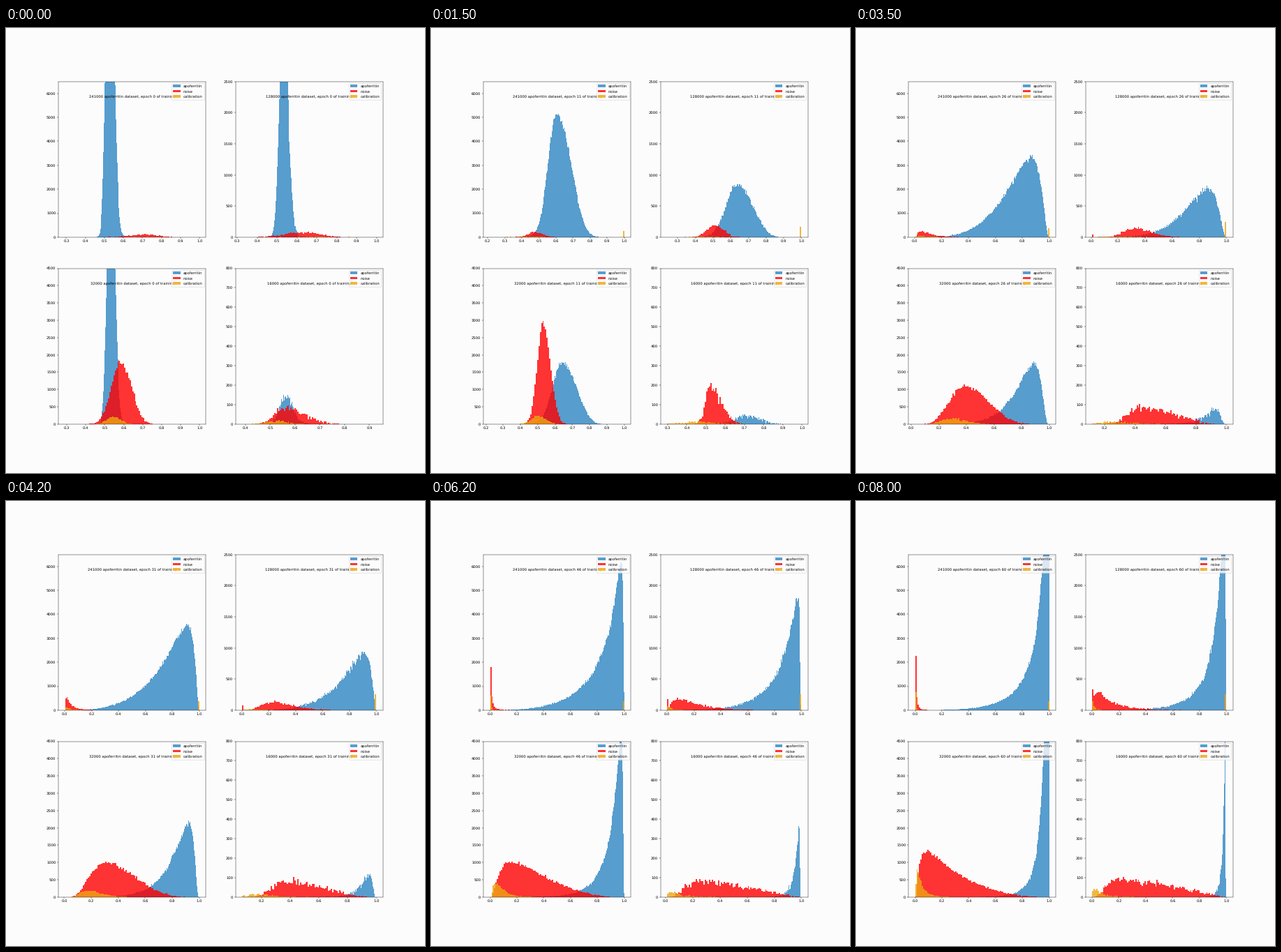
Animation, 600 px wide and 638 px high, one loop 8100 ms. Source, as a matplotlib script:

```python
import numpy as np
import matplotlib.pyplot as plt
from matplotlib.animation import FuncAnimation

plt.rcParams.update({
    "font.family": "DejaVu Sans", "text.hinting": "none",
    "figure.facecolor": "#fdfcfd", "axes.facecolor": "#fdfcfd",
})

FRAMES, INTERVAL, DPI = 81, 100, 37.5
KNOTS = (0, 11, 21, 40, 60)  # epochs at which the training curves bend

SERIES = [("apoferritin", "#2e86c1", 200), ("noise", "red", 100),
          ("calibration", "#eda612", 100)]

# Scores are bell shaped in logit space. "low" and every "mode" are logits that
# follow the knots; pairs run from the first to the last epoch.
PANELS = [
    dict(size=241000, top=6500, low=(-.88, -1.3, -5.1, -6.9, -8), high=6.5,
         signal=dict(mode=(.1, .42, 1.32, 3.3, 5), total=(213e3, 213e3), width=1.65),
         noise=dict(mode=(.93, -.09, -1.42, -7, -7), total=(2900, 3300),
                    spread=(.37, .18, .57, 1.5, 1.3), skew=1, floor=0),
         calibration=dict(mode=(1.3, -.2, -1.7, -7, -7), total=(400, 900),
                          spread=(.9, .6, .8, 1.3, 1), skew=1, ceiling=380)),
    dict(size=128000, top=2500, low=(-.73, -1.15, -3.2, -9, -9), high=6.5,
         signal=dict(mode=(.12, .54, 1.37, 3.2, 4.6),
                     total=(6e4, 41e3, 43e3, 55e3, 68e3), width=1.5),
         noise=dict(mode=(.53, .05, -.21, -2.06, -3.28), total=(2500, 5000),
                    spread=(.38, .19, .28, 1, 1.25), skew=1, floor=6.5),
         calibration=dict(mode=(.8, -.2, -.8, -5, -6), total=(200, 300),
                          spread=(.7, .5, .7, 1.5, 1.3), skew=1, ceiling=260)),
    dict(size=32000, top=4500, low=(-.89, -1.24, -2.15, -7.6, -9), high=6.5,
         signal=dict(mode=(.12, .58, 1.67, 3.3, 4.9),
                     total=(115e3, 77e3, 78e3, 98e3, 105e3), width=1.25),
         noise=dict(mode=(.33, .12, -.1, -1.42, -2.4), total=(33e3, 45e3),
                    spread=(.19, .13, .38, .93, 1.1), skew=1.3, floor=0),
         calibration=dict(mode=(.19, .02, -.26, -2.67, -4.2), total=(2700, 4500),
                          spread=(.14, .16, .32, .65, .9), skew=1.1, ceiling=0)),
    dict(size=16000, top=800, low=(-.46, -.86, -1.37, -3.84, -6.2), high=2.56,
         signal=dict(mode=(.24, .9, 2.13, 3.75, 4.8),
                     total=(3500, 2000, 1900, 3000, 4200), width=.85),
         noise=dict(mode=(.22, .09, .07, -1.05, -1.37), total=(2200, 5000),
                    spread=(.15, .1, .3, .62, .8), skew=2.3, floor=0),
         calibration=dict(mode=(.06, -.2, -.62, -2.9, -4.3), total=(300, 350),
                          spread=(.14, .3, .4, .65, .9), skew=1.4, ceiling=0)),
]


def at_epoch(values, epoch):
    knots = KNOTS if len(values) == len(KNOTS) else (KNOTS[0], KNOTS[-1])
    return np.interp(epoch, knots, values)


def sigmoid(z):
    return 1 / (1 + np.exp(-z))


def bell(x, mode, left, right, total):
    """Counts at scores x from a two-sided Gaussian in logit space."""
    z = np.log(x / (1 - x)) - mode
    shape = np.exp(-.5 * (z / np.where(z < 0, left, right)) ** 2)
    return total * shape / shape.sum()


def signal_spread(mode, width):
    """The signal widens as it moves away from an undecided score."""
    left = .05 + width * (1 - np.exp(-(mode / 2) ** 1.5))
    right = .03 + .62 * width * np.tanh(mode) ** 1.2
    return left, right


def histograms(panel, epoch, rng):
    """Noisy counts and bin edges for the three series."""
    low = sigmoid(at_epoch(panel["low"], epoch))
    high = sigmoid(panel["high"] + .27 * epoch)
    for key, (_, _, bins) in zip(("signal", "noise", "calibration"), SERIES):
        curve = panel[key]
        edges = np.linspace(low, high, bins + 1)
        x = (edges[:-1] + edges[1:]) / 2
        mode = at_epoch(curve["mode"], epoch)
        if key == "signal":
            left, right = signal_spread(mode, curve["width"])
        else:
            left = at_epoch(curve["spread"], epoch)
            right = left * curve["skew"]
        counts = bell(x, mode, left, right, at_epoch(curve["total"], epoch))
        counts += rng.normal(size=bins) * np.sqrt(counts)
        # Scores that saturate pile up in the outermost bins.
        counts[0] += curve.get("floor", 0) * max(epoch - 20, 0)
        counts[-1] += curve.get("ceiling", 0) * np.tanh(epoch / 14)
        yield np.maximum(counts, 0), edges


# The tiny surplus keeps the height from being truncated a pixel short.
fig, axes = plt.subplots(2, 2, figsize=(600 / DPI, 638.001 / DPI), dpi=DPI)
plots = []
for ax, panel in zip(axes.flat, PANELS):
    fills = [ax.stairs(np.zeros(bins), np.linspace(0, 1, bins + 1), fill=True,
                       color=color, alpha=.8, label=name)
             for name, color, bins in SERIES]
    title = ax.text(.5, .9, "", ha="center", va="center", transform=ax.transAxes)
    ax.legend(loc="upper right")
    ax.set_ylim(0, panel["top"])
    plots.append((ax, panel, fills, title))


def draw(frame):
    epoch = int(frame * .75 + .4)
    rng = np.random.default_rng(epoch)
    for ax, panel, fills, title in plots:
        for fill, (counts, edges) in zip(fills, histograms(panel, epoch, rng)):
            fill.set_data(counts, edges)
        margin = .05 * (edges[-1] - edges[0])
        ax.set_xlim(edges[0] - margin, edges[-1] + margin)
        title.set_text(f"{panel['size']} apoferritin dataset, "
                       f"epoch {epoch} of training")
    return []


animation = FuncAnimation(fig, draw, frames=FRAMES, interval=INTERVAL,
                          init_func=lambda: draw(0), repeat=True, repeat_delay=0)
plt.show()
```
